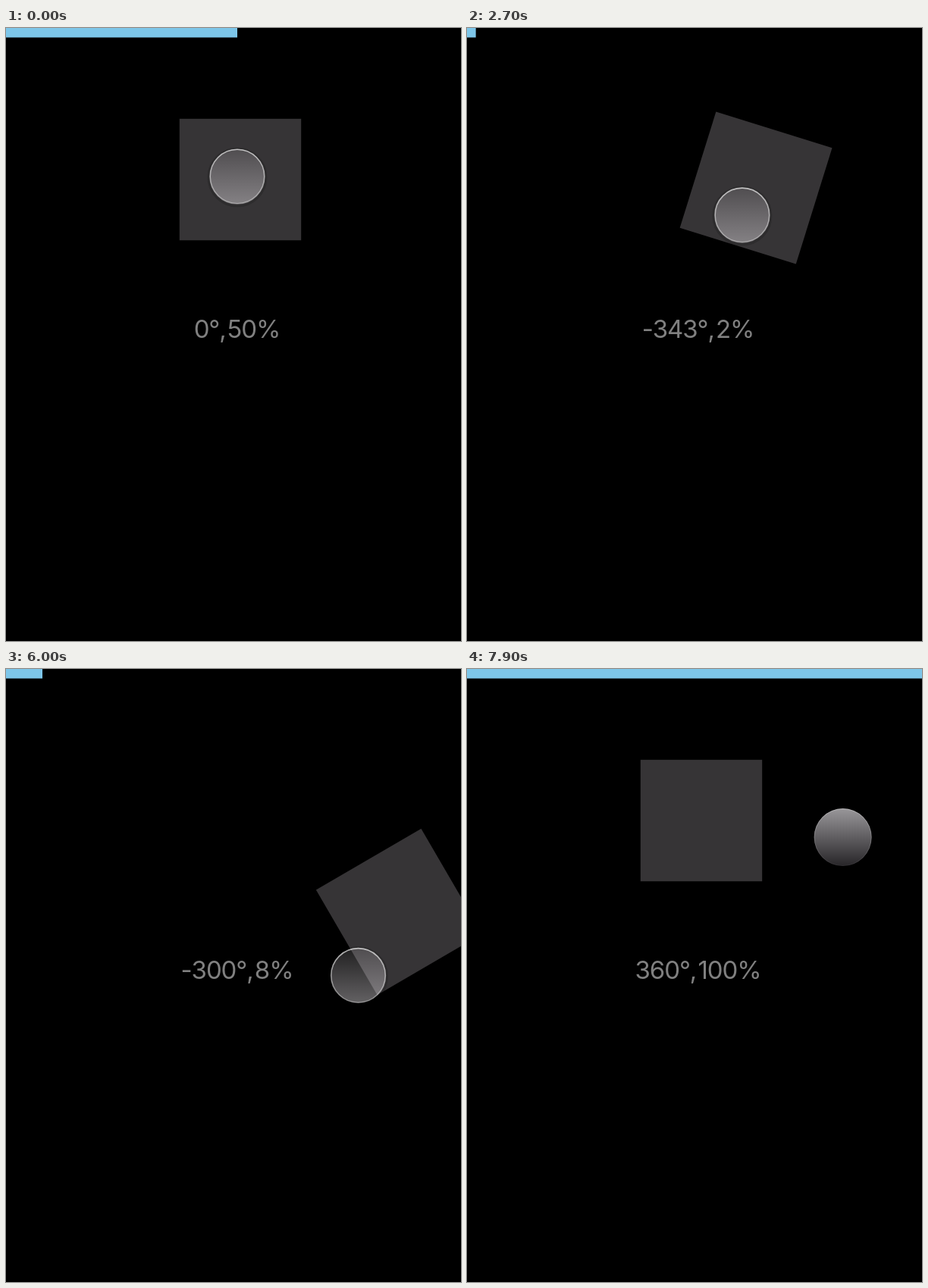
These frames come from a looping animation (600 by 809 pixels, 8 s). An HTML page with a canvas:

```html
<!DOCTYPE html>
<html lang="en">
<head>
<meta charset="utf-8">
<title>Rotation knob</title>
<style>
html, body { margin: 0; height: 100%; overflow: hidden; background: #000; }
canvas { display: block; width: 100vw; height: 100vh; }
</style>
</head>
<body>
<canvas id="stage" width="600" height="809"></canvas>
<script>
const ctx = document.getElementById('stage').getContext('2d');
const LOOP = 8000, STEP = 100, RAD = Math.PI / 180;
const TOUCH = { x: 341, y: 409 };   // the drag is measured around this point
const PIVOT = { x: 309, y: 442.4 }; // the square swings around this point
const ARM = 242.4, HALF = 80.2;

// Turning points of the drag: time, angle clockwise from the top, distance.
const drag = [
  [300, -9.6, 216], [700, 9.5, 216], [1200, -28.6, 205],           // wiggle
  [1900, -147.2, 60], [2100, -281.6, 95], [2700, -352.3, 163.5],   // full turn back
  [3600, -372.6, 174], [4000, -372.6, 174],
  [4400, -431.3, 196], [4700, -418.2, 241], [5000, -418.2, 241],   // beyond the stop
  [5300, -382.5, 277], [5600, -344.6, 132], [5700, -344.6, 132],
  [6000, -272.1, 123.6], [6600, 283, 133], [6700, 289.8, 129.7],   // two turns forward
  [7100, 399.6, 242.6]
];

// The square follows the drag from the angle where it was gripped, up to one turn.
function squareAngle(knob, t) {
  const grip = t < 5000 ? -9.6 : 28.1;
  return Math.max(-360, Math.min(360, knob - grip));
}

const slope = (i, c) => i < 0 || i > drag.length - 2 ? 0
  : (drag[i + 1][c] - drag[i][c]) / (drag[i + 1][0] - drag[i][0]);

// Harmonic mean of the neighbouring slopes: smooth without overshoot.
function tangent(i, c) {
  const a = slope(i - 1, c), b = slope(i, c);
  return a * b > 0 ? 2 * a * b / (a + b) : 0;
}

function sample(t, c) {
  const next = drag.findIndex(k => k[0] > t);
  if (next === 0) return drag[0][c];
  if (next < 0) return drag[drag.length - 1][c];
  const i = next - 1, span = drag[next][0] - drag[i][0];
  const u = (t - drag[i][0]) / span, v = 1 - u;
  return drag[i][c] * v * v * (1 + 2 * u) + drag[next][c] * u * u * (1 + 2 * v)
    + span * u * v * (tangent(i, c) * v - tangent(next, c) * u);
}

function fade(y, r, top, bottom) {
  const g = ctx.createLinearGradient(0, y - r, 0, y + r);
  g.addColorStop(0, top);
  g.addColorStop(1, bottom);
  return g;
}

function disc(x, y, r, fill) {
  ctx.beginPath();
  ctx.arc(x, y, r, 0, 2 * Math.PI);
  ctx.fillStyle = fill;
  ctx.fill();
}

function ring(x, y, r, width, stroke) {
  ctx.beginPath();
  ctx.arc(x, y, r, 0, 2 * Math.PI);
  ctx.lineWidth = width;
  ctx.strokeStyle = stroke;
  ctx.stroke();
}

function heldKnob(x, y) {
  ring(x, y + 1, 38, 3, 'rgba(0,0,0,.16)');
  disc(x, y, 36, fade(y, 36, 'rgba(255,248,255,.13)', 'rgba(255,250,255,.39)'));
  ring(x, y, 35.8, 1.6, fade(y, 36, 'rgba(255,255,255,.68)', 'rgba(255,255,255,.36)'));
}

function freeKnob(x, y) {
  disc(x, y, 38, fade(y, 38, '#99979a', '#272528'));
  ring(x, y, 37.5, 1, fade(y, 38, 'rgba(255,255,255,.3)', 'rgba(255,255,255,.04)'));
}

function label(angle) {
  ctx.font = '400 33px Inter, "Open Sans", sans-serif';
  ctx.fontKerning = 'none';
  ctx.letterSpacing = '-1.1px';
  ctx.wordSpacing = '-6px';
  ctx.textAlign = 'center';
  ctx.fillStyle = '#808080';
  ctx.fillText(`${Math.round(angle)}°, ${Math.round(angle / 7.2 + 50)}%`, 304.5, 408.5);
}

function draw(t) {
  const knob = sample(t, 1), dist = sample(t, 2);
  const angle = squareAngle(knob, t);

  ctx.fillStyle = '#000';
  ctx.fillRect(0, 0, 600, 809);

  ctx.save();
  ctx.translate(PIVOT.x, PIVOT.y);
  ctx.rotate(angle * RAD);
  ctx.fillStyle = '#363436';
  ctx.fillRect(-HALF, -ARM - HALF, 2 * HALF, 2 * HALF);
  ctx.restore();

  ctx.fillStyle = '#7dc6e9';
  ctx.fillRect(0, 0, Math.max(0, 305 + angle * 0.856), 12.5);

  label(angle);

  const x = TOUCH.x + dist * Math.sin(knob * RAD);
  const y = TOUCH.y - dist * Math.cos(knob * RAD);
  (t < 7900 ? heldKnob : freeKnob)(x, y);
}

const start = performance.now();
function tick() {
  const t = (performance.now() - start) % LOOP;
  draw(Math.floor(t / STEP) * STEP);
  requestAnimationFrame(tick);
}
tick();
</script>
</body>
</html>
```
